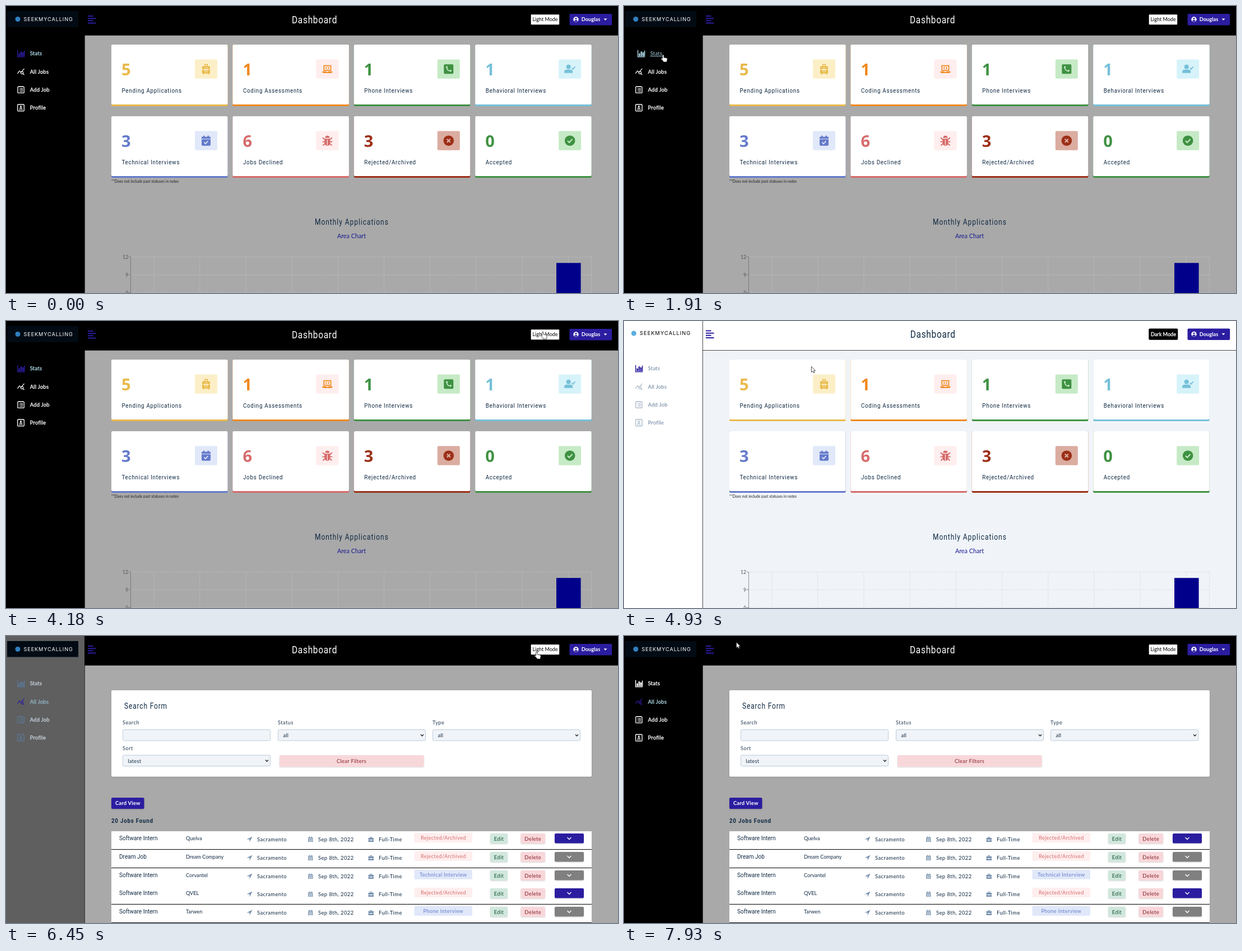
Recreate the animation shown at these times as an HTML page. Size 1092x513 px, loop 8000 ms.

```html
<!DOCTYPE html>
<html lang="en">
<head>
<meta charset="utf-8">
<title>Job dashboard</title>
<style>
html, body { margin: 0; width: 100%; height: 100%; overflow: hidden; background: #a9a9a9; }
svg { display: block; width: 100%; height: 100%; }
text { font-family: Lato, 'Open Sans', sans-serif; white-space: pre; }
.cond { font-family: Roboto, sans-serif; }
.logo { font-family: Inter, sans-serif; }
.count { font-family: 'Open Sans', sans-serif; font-weight: 700; }
.lift { filter: drop-shadow(0 1px 1px rgba(0,0,0,.16)); }
</style>
</head>
<body>
<svg id="stage" viewBox="0 0 1092 513" preserveAspectRatio="none">
  <rect id="bg" width="1092" height="513"/>
  <g id="page">
    <g id="stats"></g>
    <g id="jobs"></g>
    <g id="head"></g>
  </g>
  <g id="spinner" fill="none" stroke-width="3">
    <circle cx="621.5" cy="97" r="26" stroke="#829ab1"/>
    <path id="arc" d="M603.1 78.6A26 26 0 0 1 639.9 78.6" stroke="#2b1da0"/>
  </g>
  <g id="side"></g>
  <g id="cursor" stroke-linejoin="round"></g>
</svg>
<script>
const LOOP = 8000, BLUE = '#2b1da0', INK = '#102a43';
const $ = id => document.getElementById(id);

// ---- drawing helpers ----
const rect = (x, y, w, h, fill, more = '') =>
  `<rect x="${x}" y="${y}" width="${w}" height="${h}" fill="${fill}" ${more}/>`;
const path = (d, more = '') => `<path d="${d}" ${more}/>`;
const disc = (x, y, r, fill) => `<circle cx="${x}" cy="${y}" r="${r}" fill="${fill}"/>`;
const line = (d, color, width = 1, more = '') =>
  path(d, `fill="none" stroke="${color}" stroke-width="${width}" ${more}`);
const group = (x, y, body) => `<g transform="translate(${x} ${y})">${body}</g>`;
const text = (s, x, y, size, fill, more = '') =>
  `<text x="${x}" y="${y}" font-size="${size}" fill="${fill}" ${more}>${s}</text>`;
const mid = (s, x, y, size, fill, more = '') => text(s, x, y, size, fill, 'text-anchor="middle" ' + more);
const spaced = n => `letter-spacing="${n}"`;
// condensed heading face
const cond = (s, x, y, size, fill, gap = 0, more = '') =>
  `<text class="cond" transform="translate(${x} ${y}) scale(.86 1)" font-size="${size}" fill="${fill}" letter-spacing="${gap / .86}" ${more}>${s}</text>`;
const soft = 'rx="2" class="lift"';

// ---- stat cards: icons sit in a 20 unit box, c = colour, b = backdrop ----
const icons = {
  bag: (c, b) => path('M7 5V1h6v4h2.5q1.5 0 1.5 1.5V10H3V6.5Q3 5 4.500 5zM8.500 5h3V2.500h-3zM3 11h3v1.500h8V11h3v5.500q0 1-1.500 1.500v1.500h-2V18h-7v1.500h-2V18Q3 17.500 3 16.500z', `fill="${c}" fill-rule="evenodd"`) + line('M6 8h8M6 15h8', b, .9),
  laptop: c => path('M3 3h14v10H3zM4.7 4.7v6.6h10.6V4.7zM1 14h7l.5 1h3l.5-1h7v1q0 2-2 2H3q-2 0-2-2z', `fill="${c}" fill-rule="evenodd"`) + line('M9 6.2 7 8l2 1.8M11 6.2 13 8l-2 1.8', c, 1.2),
  phone: (c, b) => rect(1.5, 1.5, 17, 17, c, 'rx="2"') + line('M6.5 5.7Q6.500 13 14 14', b, 1.6) + line('M6.2 5.200l1.200 2.500M12 12.300l2.800 1.300', b, 2.8),
  person: c => disc(7.5, 6, 4, c) + path('M0 17v-2q0-4 4-4h7q4 0 4 4v2z', `fill="${c}"`) + line('M13.5 8l2 2.2 4-4.7', c, 1.7),
  calendar: (c, b) => path('M2 3h3V1h2.5v2h5V1H15v2h3v3.500H2zM2 7.500h16V17q0 2-2 2H4q-2 0-2-2z', `fill="${c}"`) + line('M6.5 13l2.500 2.500 4.500-5', b, 1.7),
  bug: (c, b) => path('M6 5Q6 1 10 1t4 4zM5 6.5h10V13q0 6-5 6t-5-6z', `fill="${c}"`) + line('M1.5 4.500 5.500 8M18.500 4.500 14.500 8M1 12h18M2 18.500l4-3.500M18 18.500l-4-3.500', c, 1.8) + line('M10 8v10', b, 1.2),
  cross: (c, b) => disc(10, 10, 9.3, c) + line('M7 7l6 6M13 7l-6 6', b, 2.3),
  check: (c, b) => disc(10, 10, 9.3, c) + line('M5.8 10.3l3 3 5.500-6', b, 2)
};
const cards = [
  [5, 'Pending Applications', '#e9b949', '#fcefc7', 'bag'],
  [1, 'Coding Assessments', '#f0891f', '#ffeeee', 'laptop'],
  [1, 'Phone Interviews', '#3f9142', '#c6eac6', 'phone'],
  [1, 'Behavioral Interviews', '#74c0d8', '#d7f3fa', 'person'],
  [3, 'Technical Interviews', '#647acb', '#e0e8f9', 'calendar'],
  [6, 'Jobs Declined', '#d66a6a', '#ffeeee', 'bug'],
  [3, 'Rejected/Archived', '#9c2f17', '#dbaca0', 'cross'],
  [0, 'Accepted', '#3f9142', '#c6eac6', 'check']
];
const card = ([n, label, c, b, icon], i) => group(188 + i % 4 * 216.4, 69 + (i >> 2) * 128,
  rect(0, 0, 207.5, 110, c, 'rx="2"') + rect(0, 0, 207.5, 107, '#fff', 'rx="2"') +
  text(n, 18, 54.5, 29, c, 'class="count"') + cond(label, 18.5, 85.5, 11.4, INK, .75) +
  rect(149, 26.6, 40, 34.2, b, 'rx="2"') + group(159, 33.7, icons[icon](c, b)));

function chart() {
  const left = 222.5, right = 1044.5, top = 448.7, step = 31.8, pitch = 82.2;
  const base = top + 4 * step;
  const months = ['Dec 2021', ...'Jan Feb Mar Apr May Jun Jul Aug Sep'.split(' ').map(m => m + ' 2022')];
  let out = '', grid = '';
  for (let i = 0; i < 5; i++) {
    const y = top + i * step;
    grid += `M${left} ${y}H${right}`;
    out += line(`M${left - 4} ${y}h4`, '#666', .7) + text(12 - 3 * i, left - 4.5, y + 3, 8.6, '#555', 'text-anchor="end"');
  }
  months.forEach((m, i) => {
    const x = left + pitch * (i + .5), h = (i === 9 ? 11 : 1) * step / 3;
    grid += `M${x} ${top}V${base}`;
    out += rect(x - 21.4, base - h, 43.6, h, '#00008b') + mid(m, x, base + 13, 8.6, '#555');
  });
  return line(grid + `M${right} ${top}V${base}`, '#ccc', .7, 'stroke-dasharray="2 2"') + out +
    line(`M${left} ${top}V${base}H${right}`, '#666', .7);
}
$('stats').innerHTML = cards.map(card).join('') +
  text('**Does not include past statuses in notes', 188, 315.5, 6.7, '#222') +
  cond('Monthly Applications', 551, 391, 14, INK, .95) +
  mid('Area Chart', 616.5, 414.7, 10.8, '#1a1a92') + chart();

// ---- job list ----
const field = (label, x, y, value) =>
  text(label, x, y, 9.2, '#243b53', spaced(.5)) +
  rect(x + .5, y + 9.5, 263, 19.5, '#f0f4f8', 'rx="2" stroke="#bcccdc"') +
  (value ? text(value, x + 9.5, y + 23, 9.2, INK, spaced(.3)) +
    line(`M${x + 255} ${y + 18}l2.5 2.7 2.5-2.7`, '#222', 1.3) : '');

const REJ = 'Rejected/Archived', TECH = 'Technical Interview';
const rows = [
  ['Software Intern', 'Quelva', REJ, 1],
  ['Dream Job', 'Dream Company', REJ, 0],
  ['Software Intern', 'Corvantel', TECH, 0],
  ['Software Intern', 'QVEL', REJ, 1],
  ['Software Intern', 'Tarwen', 'Phone Interview', 0],
  ['Software Intern', 'Hollbeck Verrin', 'Behavioral Interview', 0],
  ['Software Developer', 'Zelqua', TECH, 1]
];
const slate = 'fill="#7590ad"';
const rowIcons = path('M429.5 363.5 439.5 358.5 434.7 368.5V363.5z', slate) +
  path('M539 360h2v-1.5h1.3v1.5h2.4v-1.5h1.3v1.5h1.5v1.5H539zM539 362.3h8.5v5.7H539z', slate) +
  line('M539.5 364.2h7.5M539.5 366.2h7.5M541.8 362.5v5.5M544.6 362.5v5.5', '#fff', .6) +
  path('M646.5 361h2.7v-2h4v2h2.8v3h-9.5zM650.2 361h2v-1h-2zM646.5 364.7h3.5v1h2.5v-1h3.5v3.3h-9.5z', slate + ' fill-rule="evenodd"');

const button = (s, x, w, fill, color) => rect(x, 353, w, 18, fill, soft) +
  mid(s, x + w / 2, 366, 9.4, color, spaced(.4));

function row(i) {
  const [title, firm, status, open] = rows[i % rows.length], bad = status === REJ;
  return group(0, Math.round(32.8 * i),
    rect(188, 349, 857, 33, '#fff') + rect(188, 381, 857, 1, '#000') +
    cond(title, 202, 365.3, 11.7, INK) + text(firm, 321, 365.3, 9.15, INK) + rowIcons +
    [['Sacramento', 448], ['Sep 8th, 2022', 557], ['Full-Time', 665]]
      .map(([s, x]) => text(s, x, 366.6, 9.4, INK, spaced(.43))).join('') +
    rect(728.5, 352, 103.5, 17, bad ? '#ffeeee' : '#e0e8f9', 'rx="2"') +
    mid(status, 780.3, 363.5, 9.1, bad ? '#d66a6a' : '#647acb', spaced(.42)) +
    button('Edit', 864, 31, '#d1e7dd', '#0f5132') + button('Delete', 918.5, 43.5, '#f8d7da', '#842029') +
    rect(979, 353, 52, 17.5, open ? BLUE : '#808080', soft) + line('M1001.5 360l3.5 3.4 3.5-3.4', '#fff', 1.4));
}
$('jobs').innerHTML = rect(188, 97, 857, 154.5, '#fff', soft) + cond('Search Form', 211, 129.7, 14, INK, .82) +
  field('Search', 208, 158) + field('Status', 485, 158, 'all') + field('Type', 761, 158, 'all') + field('Sort', 208, 203.5, 'latest') +
  rect(488, 213, 257.5, 20.8, '#f8d7da', soft) + mid('Clear Filters', 616.5, 226.6, 9.4, '#842029', spaced(.3)) +
  rect(188, 289, 58.5, 20, BLUE, soft) + mid('Card View', 217.3, 302, 9.4, '#fff', 'font-weight="700" ' + spaced(.2)) +
  cond('20 Jobs Found', 188, 333.7, 11.4, INK, .75, 'font-weight="700"') +
  Array.from({ length: 20 }, (_, i) => row(i)).join('');

// ---- header ----
const modeButton = light => light
  ? rect(936.3, 14, 52, 20.3, '#000', 'rx="2"') + mid('Dark Mode', 962.5, 27.3, 9.1, '#fff', 'stroke="#fff" stroke-width=".3"')
  : rect(936.7, 15.3, 50.5, 18, '#fff', 'rx="1"') + mid('Light Mode', 962, 27.3, 9, '#000');
const userButton = rect(1005.5, 14, 75.7, 20.5, BLUE, 'rx="2"') +
  disc(1017, 24, 4.7, '#fff') + disc(1017, 22.5, 1.6, BLUE) +
  path('M1014 27q.5-2 3-2t3 2q-1.2 1.2-3 1.2t-3-1.2z', `fill="${BLUE}"`) +
  mid('Douglas', 1043.5, 27.3, 9.3, '#fff', 'font-weight="700"') + path('M1066.5 22.5h6l-3 3.3z', 'fill="#fff"');
const header = (light, shift) => rect(140, 0, 952, 52.7, '#000') +
  (light ? rect(140, 0, 952, 52, '#fff') : '') +
  group(0, light ? -.5 : 0,
    line('M146 18h9.5M146 22.2h14.5M146 26.300h9.500M146 30.500h14.500', BLUE, 2.1) +
    cond('Dashboard', 510 + shift / 2 + (light ? .7 : 0), 30.5, 18, light ? INK : '#fff', .7) +
    group(shift, 0, modeButton(light) + userButton));

// ---- sidebar ----
const linkIcons = [
  c => line('M.7 0V12.2H13.5', c, 1.4) + path('M2.5 6h2.500v5H2.500zM5.800 2.500h2.500v8.500H5.800zM9 4h2.500v7H9zM12 1h1.500v10H12z', `fill="${c}"`),
  c => line('M.5 10 4 5l3 2.5L12.500 1', c, 1.2) + `<circle cx="8.5" cy="8.3" r="2.2" fill="none" stroke="${c}" stroke-width="1.2"/>` + line('M10 10l2.5 2.2', c, 1.3),
  c => rect(.7, 1.3, 11.6, 11, 'none', `rx="1" stroke="${c}" stroke-width="1.2"`) + line('M3 0v2M5.3 0v2M7.7 0v2M10 0v2M2.7 4.8h1M5 4.8h5.5M2.7 7.2h1M5 7.2h5.5M2.7 9.7h1M5 9.7h5.5', c, 1.1),
  c => rect(.7, .7, 11.6, 11.8, 'none', `rx="1" stroke="${c}" stroke-width="1.3"`) + disc(6.5, 4.3, 1.5, c) + path('M3.7 8.3q0-2 2.8-2t2.8 2z', `fill="${c}"`) + line('M3 10h7', c, 1)
];
const links = ['Stats', 'All Jobs', 'Add Job', 'Profile'];
const linkY = i => 85 + 32.2 * i;
const mix = (a, b, k) => `rgb(${a.map((v, i) => Math.round(v + (b[i] - v) * k))})`;
const WHITE = [255, 255, 255], SLATE = [98, 125, 152], SKY = [173, 216, 230];

function sidebar(light, m, active, hover) {
  const moving = m > 0 && m < 1;
  let out = rect(0, 0, 140.7, 513, '#000') + rect(0, 0, 140, 513, mix([0, 0, 0], WHITE, m));
  out += light
    ? disc(17.5, 22, 4.5, '#5aaee0') + text('SEEKMYCALLING', 28, 25.2, 9.3, '#000', 'class="logo" ' + spaced(1.05))
    : rect(2, 9, 127, 28.5, '#020b14') + disc(21, 23.5, 4.5, '#2f7fc0') +
      text('SEEKMYCALLING', 31.5, 27.3, 9.2, '#fff', 'class="logo" ' + spaced(.87));
  links.forEach((name, i) => {
    const on = i === active, over = i === hover;
    const color = mix(on || over ? SKY : WHITE, SLATE, m);
    let icon = moving ? '#5b7896' : light ? '#a9b8c8' : '#fff';
    if (on) icon = BLUE;
    if (over) icon = color;
    out += group(over ? 24 : 20, linkY(i), group(0, -6.3, linkIcons[i](icon)) +
      text(name, 22.7, 3.3, 9.4, color, spaced(.28) + (over ? ' text-decoration="underline"' : '') +
        (light || over ? '' : ` stroke="${color}" stroke-width=".35"`)));
  });
  return out;
}

// ---- pointer ----
const outline = 'fill="#fff" stroke="#222" stroke-width=".8"';
const pointers = {
  arrow: path('M0 0V10.3L2.4 8.2 4 11.6 5.7 10.8 4.2 7.5H7.2Z', outline),
  hand: path('M-1.5 1Q0-.8 1 1V5l5 1q1.5.3 1.3 2L6.5 11.5V13H0V11.5L-4 7.5Q-3.8 6-2.3 6.7L-1.5 7.5Z', outline),
  beam: line('M-2-5.5Q0-5.5 0-4.5V4.5Q0 5.5-2 5.5M2-5.5Q0-5.5 0-4.5M0 4.5Q0 5.5 2 5.5', '#222', 1)
};
const moves = [
  [1690, 250, 525], [1900, 70, 87], [2080, 70, 87], [2280, 60, 115], [2480, 62, 117], [2850, 86, 92],
  [3340, 84, 92], [3500, 115, 110], [3850, 800, 6], [4080, 958, 19], [4400, 958, 19], [4930, 334.3, 81.3],
  [5280, 60, 114], [5800, 62, 115], [6240, 947, 28], [6520, 947, 28], [7150, 242, 54], [7680, 242, 54],
  [7900, 200.5, 11]
];
const scrollStats = [[70, 0], [780, 140], [890, 140], [1600, 0]];
const scrollJobs = [[7330, 0], [7410, 67], [7560, 230], [7650, 230], [7860, 0]];

const clamp = v => Math.min(1, Math.max(0, v));
const smooth = v => v * v * (3 - 2 * v);
function follow(keys, t, ease = v => v) {
  let i = 0;
  while (i < keys.length - 2 && t >= keys[i + 1][0]) i++;
  const a = keys[i], b = keys[i + 1], k = ease(clamp((t - a[0]) / (b[0] - a[0])));
  return a.slice(1).map((v, j) => v + (b[j + 1] - v) * k);
}

const LIGHT_ON = 4330, LIGHT_OFF = 6275;
const cache = {};
function fill(id, html) {
  if (cache[id] !== html) $(id).innerHTML = cache[id] = html;
}
const show = (id, on) => $(id).setAttribute('visibility', on ? 'visible' : 'hidden');

function draw(t) {
  const light = t >= LIGHT_ON && t < LIGHT_OFF;
  const m = smooth(clamp((t - LIGHT_ON) / 300)) - smooth(clamp((t - LIGHT_OFF) / 300));
  const loading = t >= 2380 && t < 3000 || t >= 5350 && t < 5620;
  const active = t >= 2380 && t < 2930 || t >= 5350 ? 1 : 0;
  const onJobs = t >= 5620;
  const [x, y] = follow(moves, t, smooth);
  const seen = t > 1690;
  const hover = seen && x < 135 ? links.findIndex((_, i) => Math.abs(y - linkY(i)) < 16) : -1;
  const onMode = x > 935 && x < 989 && y > 13 && y < 34;
  const kind = hover >= 0 || onMode ? 'hand' : t > 7100 && t < 7720 ? 'beam' : 'arrow';
  const [scroll] = onJobs ? follow(scrollJobs, t) : follow(scrollStats, t, smooth);

  $('bg').setAttribute('fill', light ? '#f0f4f8' : '#a9a9a9');
  $('page').setAttribute('transform', `translate(0 ${-Math.round(scroll)})`);
  show('stats', !loading && !onJobs);
  show('jobs', !loading && onJobs);
  show('spinner', loading);
  $('arc').setAttribute('transform', `rotate(${5 + (t - 2850) * .6} 621.5 97)`);
  fill('head', header(light, loading ? 10 : 0));
  fill('side', sidebar(light, m, active, hover));
  fill('cursor', pointers[kind]);
  show('cursor', seen);
  $('cursor').setAttribute('transform', `translate(${x} ${y})`);
}

const start = performance.now();
function tick() {
  draw((performance.now() - start) % LOOP);
  requestAnimationFrame(tick);
}
tick();
</script>
</body>
</html>
```
